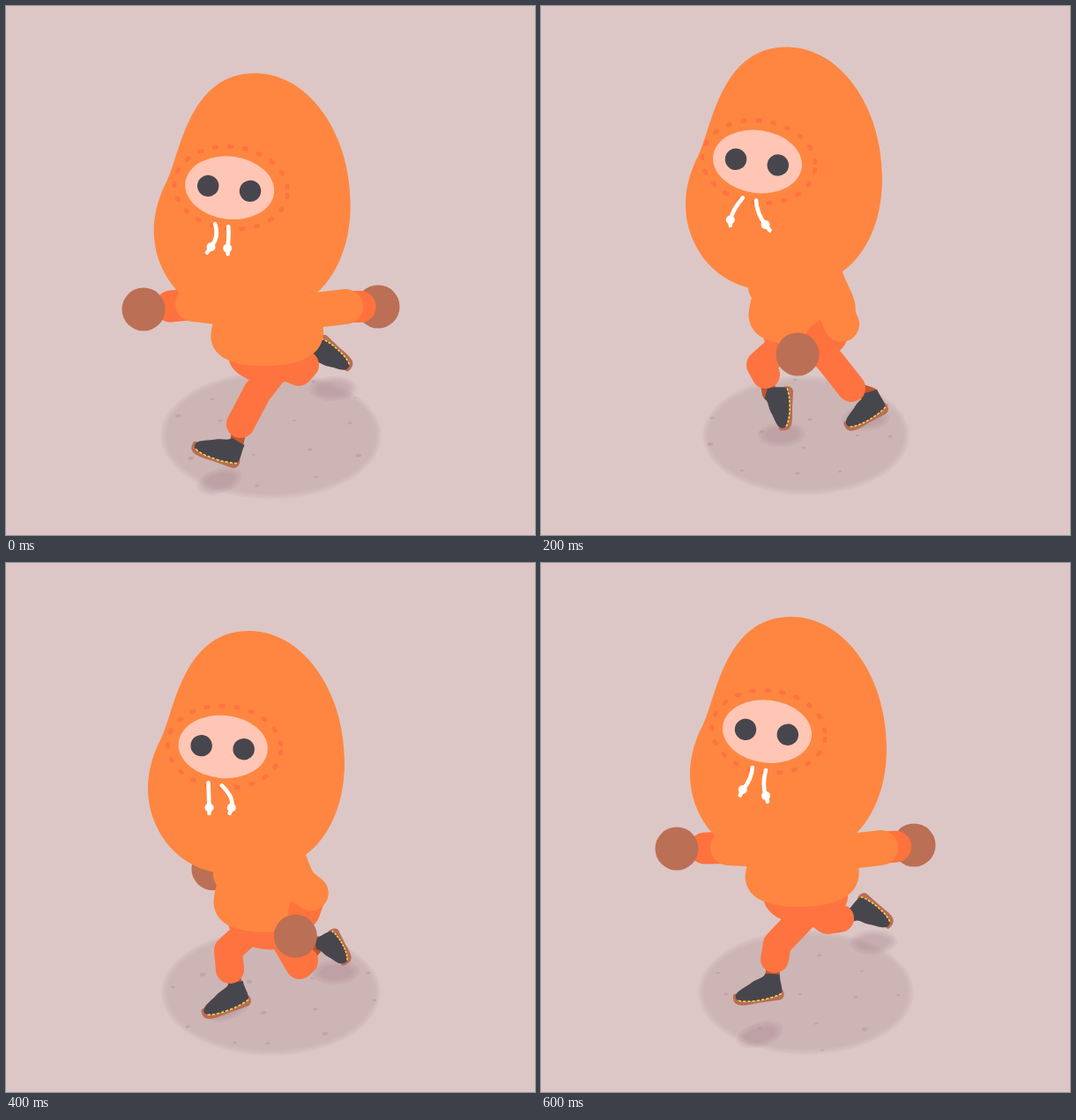
An HTML page with a canvas for the animation above (0.64 s loop, 600x600 px).

```html
<!DOCTYPE html>
<html lang="en">
<head>
<meta charset="utf-8">
<title>Runner in a hood</title>
<style>
html, body { margin: 0; width: 100%; height: 100%; overflow: hidden; background: #dcc7c6; }
canvas { display: block; width: 600px; height: 600px; }
</style>
</head>
<body>
<canvas id="stage" width="600" height="600"></canvas>
<script>
const c = document.getElementById('stage').getContext('2d');
const LOOP = 640, STRIDE = 320, STEP = 40;
const HOOD = '#ff8640', PANTS = '#ff7340', CUFF = '#ff723d', SKIN = '#ffc6b5',
  GLOVE = '#bb6f55', DARK = '#48464d', SOLE = '#b86e54', ANKLE = '#c2562d', STITCH = '#ffd24a';

const HEAD = new Path2D('M279 46C338 46 387 112 387 195C387 245 368 285 336 305C312 322 280 325 240 320C195 312 164 270 164 225C164 202 172 181 178 170C194 140 202 46 279 46Z');
const TORSO = new Path2D('M-54 -95C-56 -55 -66 -44 -63 -28C-58 -4 -26 0 -4 0C34 0 66 -10 64 -42C63 -58 52 -68 44 -95Z');
const SOLE_SHAPE = new Path2D('M-29 5C-29 16 -16 15 0 14L22 14C30 14 30 4 27 2L-27 0C-29 1 -29 3 -29 5Z');
const SHOE = new Path2D('M11 -18L27 -15C26 -6 29 2 26 7C14 12 -18 13 -25 7C-30 -2 -14 -5 -6 -10C2 -14 8 -13 11 -18Z');
const SEAM = new Path2D('M26 7C14 12 -18 13 -25 7');

// time, head x/y, hem y, hem width, ground radius, then per cord: end x/y, bow, tail
const BOB = [
  [0, 3.7, 28, 406, 1, 125, -4.5, 26, 5, -4.5, -1, 24.5, 1, .5],
  [80, -3, 32.5, 420, .95, 124, 1, 28, 0, 0, 11, 25, 6, -2],
  [120, -5, 16.3, 405, .94, 119, -3, 29, -2, 2, 14, 22, 3, 2],
  [200, 0, 1.3, 385, .95, 117, -14, 25, -3, 0, 10.5, 27.5, -3, 5],
  [280, 5, 13, 388, 1.01, 122, -11, 25, 3, -3, 0, 29, -3, 2]];
// time, face offset x/y, tilt in degrees
const FACE = [[0, 4.5, 0, 7], [80, 1, 2, 6], [200, 0, 0, 8], [320, 2, 0, 8],
  [440, 4.5, 2, 3.5], [520, 5.5, 1, 5], [600, 6, 0, 7]];
// time, foot x/y, foot angle, foot length, trouser end x/y, knee x/y, shadow drop
const LEG = [
  [0, 225, 495, 20, 1, 251, 466, 270, 430, 36],
  [80, 263, 505, -19, 1, 269, 469, 267, 447, 8],
  [120, 293, 490, -21, 1, 293, 453, 287, 428, 5],
  [200, 351, 452, -28, .93, 337, 425, 314, 396, 8],
  [280, 390, 407, -138, .87, 354, 411, 340, 413, 31],
  [320, 384, 406, -136, .87, 354, 415, 347, 423, 36],
  [400, 357, 430, -116, .75, 323, 443, 318, 448, 26],
  [440, 331, 443, -118, .85, 299, 429, 293, 429, 25],
  [520, 286, 464, -87, .87, 270, 426, 264, 415, 30],
  [600, 231, 477, -8, 1, 250, 441, 253, 424, 50]];
// time, elbow x/y, hand x/y
const LEFT_ARM = [[0, 385, 341, 422, 341], [80, 380, 378, 411, 397], [200, 341, 361, 291, 395],
  [320, 327, 385, 270, 417], [440, 357, 362, 362, 414], [520, 373, 314, 410, 331], [600, 385, 323, 423, 320]];
const RIGHT_ARM = [[0, 212, 338, 156, 344], [80, 228, 346, 189, 373], [200, 270, 320, 265, 328],
  [320, 270, 345, 262, 345], [440, 262, 325, 216, 345], [520, 218, 314, 163, 331], [600, 212, 323, 154, 324]];
const SPECKS = [[234, 446], [243, 470], [195, 465], [327, 470], [390, 473], [210, 513], [281, 509],
  [345, 503], [400, 510], [352, 534], [285, 544], [291, 440], [123, 519], [140, 564], [296, 572],
  [194, 582], [231, 583], [226, 548], [133, 596], [85, 578], [157, 505], [174, 623], [29, 562]];

// smooth periodic curve through rows of [time, ...values]
function sample(keys, t, period) {
  t %= period;
  const n = keys.length;
  const at = i => keys[(i + n) % n];
  const when = i => at(i)[0] + Math.floor(i / n) * period;
  let i = n - 1;
  while (keys[i][0] > t) i--;
  const t0 = when(i - 1), t1 = when(i), t2 = when(i + 1), t3 = when(i + 2);
  const d = t2 - t1, u = (t - t1) / d, v = 1 - u;
  return at(i).slice(1).map((p, k) => {
    const q = at(i + 1)[k + 1];
    const m = (q - at(i - 1)[k + 1]) / (t2 - t0) * d;
    const w = (at(i + 2)[k + 1] - p) / (t3 - t1) * d;
    return p * v * v * (1 + 2 * u) + m * u * v * v + q * u * u * (3 - 2 * u) - w * u * u * v;
  });
}

function oval(x, y, rx, ry, color, turn = 0) {
  c.fillStyle = color;
  c.beginPath();
  c.ellipse(x, y, rx, ry, turn, 0, 7);
  c.fill();
}

function line(width, color, ...points) {
  c.lineWidth = width;
  c.strokeStyle = color;
  c.beginPath();
  points.forEach(p => c.lineTo(...p));
  c.stroke();
}

function place(x, y, turn, sx, draw) {
  c.save();
  c.translate(x, y);
  c.rotate(turn);
  c.scale(sx, 1);
  draw();
  c.restore();
}

function fill(path, color) {
  c.fillStyle = color;
  c.fill(path);
}

function ground(t, r) {
  for (let i = 0; i < 4; i++) oval(300.5, 487, r - i * 2, r * .577 - i * 2, 'rgba(188,160,163,.16)');
  c.save();
  c.beginPath();
  c.ellipse(300.5, 487, r - 3, r * .577 - 3, 0, 0, 7);
  c.clip();
  const run = t % STRIDE / STRIDE;
  SPECKS.forEach(([x, y], i) => {
    for (const k of [run - 1, run, run + 1])
      oval(x + 264 * k, y - 152 * k, 2 + i % 3 * .7, 1.2 + i % 3 * .35, '#bfa5a7', -.15);
  });
  c.restore();
}

function limb(t, side) {
  const [fx, fy, angle, size, ex, ey, kx, ky, drop] = sample(LEG, t, LOOP);
  const dx = 15 * side, dy = 8 * side;
  return { x: fx + dx, y: fy + dy, turn: angle * Math.PI / 180, size,
    end: [ex + dx, ey + dy], knee: [kx + dx, ky + dy], drop, side };
}

function footShadow(f) {
  const turn = f.x < 262 ? -.3 : -.05;
  for (let i = 0; i < 4; i++)
    oval(f.x + 2, f.y + f.drop, 27 - i * 3, 14 - i * 2, 'rgba(165,130,136,.11)', turn);
}

function leg(f, hem) {
  const cos = Math.cos(f.turn), sin = Math.sin(f.turn), ax = 18 * f.size, ay = -13;
  line(16, ANKLE, f.end, [f.x + ax * cos - ay * sin, f.y + ax * sin + ay * cos]);
  place(f.x, f.y, f.turn, f.size, () => {
    fill(SOLE_SHAPE, SOLE);
    fill(SHOE, DARK);
    c.lineCap = 'butt';
    c.setLineDash([3.2, 2]);
    c.lineWidth = 1.6;
    c.strokeStyle = STITCH;
    c.stroke(SEAM);
  });
  const hip = f.side > 0 ? [310, hem - 2] : [288, hem - 12];
  line(32, PANTS, hip, f.knee, f.end);
}

function arm(keys, t, shoulder, frontX) {
  const [ex, ey, hx, hy] = sample(keys, t, LOOP);
  const hand = () => oval(hx, hy, 24.5, 24.5, GLOVE);
  if (hx >= frontX) hand();
  line(36, CUFF, [ex, ey], [ex + (hx - ex) * .45, ey + (hy - ey) * .45]);
  line(40, HOOD, shoulder, [ex, ey]);
  if (hx < frontX) hand();
}

function cord(x, y, [dx, dy, bow, tail]) {
  c.strokeStyle = '#fff';
  c.lineWidth = 4.6;
  c.beginPath();
  c.moveTo(x, y);
  c.quadraticCurveTo(x + dx / 2 + bow * 1.5, y + dy * .55, x + dx, y + dy);
  c.lineTo(x + dx + tail, y + dy + 6.5);
  c.stroke();
  oval(x + dx, y + dy, 5, 5, '#fff');
}

function face(x, y, tilt) {
  place(x, y, tilt, 1, () => {
    c.setLineDash([2.4, 14.6]);
    c.lineWidth = 5;
    c.strokeStyle = PANTS;
    c.beginPath();
    c.ellipse(1.5, 0, 64.5, 46.5, 0, 0, 2 * Math.PI);
    c.stroke();
    oval(0, 0, 50.7, 35.6, SKIN);
    oval(-24.6, .8, 12.2, 12.2, DARK);
    oval(23.6, .8, 12.2, 12.2, DARK);
  });
}

function draw(t) {
  const [hx, lift, hemY, hemW, radius, ...cords] = sample(BOB, t, STRIDE);
  const sway = 2.2 * Math.cos(2 * Math.PI * t / LOOP);
  const hy = lift + sway, hem = hemY + sway;
  const left = limb(t, 1), right = limb(t + STRIDE, -1);

  c.fillStyle = '#dcc7c6';
  c.fillRect(0, 0, 600, 600);
  c.lineCap = c.lineJoin = 'round';
  ground(t, radius);
  footShadow(right);
  footShadow(left);

  arm(RIGHT_ARM, t, [255, hem - 65], 176);
  leg(right, hem);
  oval(300, hem - 12, 48, 32, PANTS);
  leg(left, hem);
  place(296, hem, 0, hemW, () => fill(TORSO, HOOD));
  place(hx, hy, 0, 1, () => fill(HEAD, HOOD));

  const [ox, oy, tilt] = sample(FACE, t, LOOP);
  const fx = 245.5 + hx + ox, fy = 176 + hy + oy;
  face(fx, fy, tilt * Math.PI / 180);
  cord(fx - 16.7, fy + 41, cords.slice(0, 4));
  cord(fx - 1.5, fy + 44, cords.slice(4));
  arm(LEFT_ARM, t, [325, hem - 60], 330);
}

const start = performance.now();
function tick() {
  const t = (performance.now() - start) % LOOP;
  draw(Math.floor(t / STEP) * STEP);
  requestAnimationFrame(tick);
}
tick();
</script>
</body>
</html>
```
